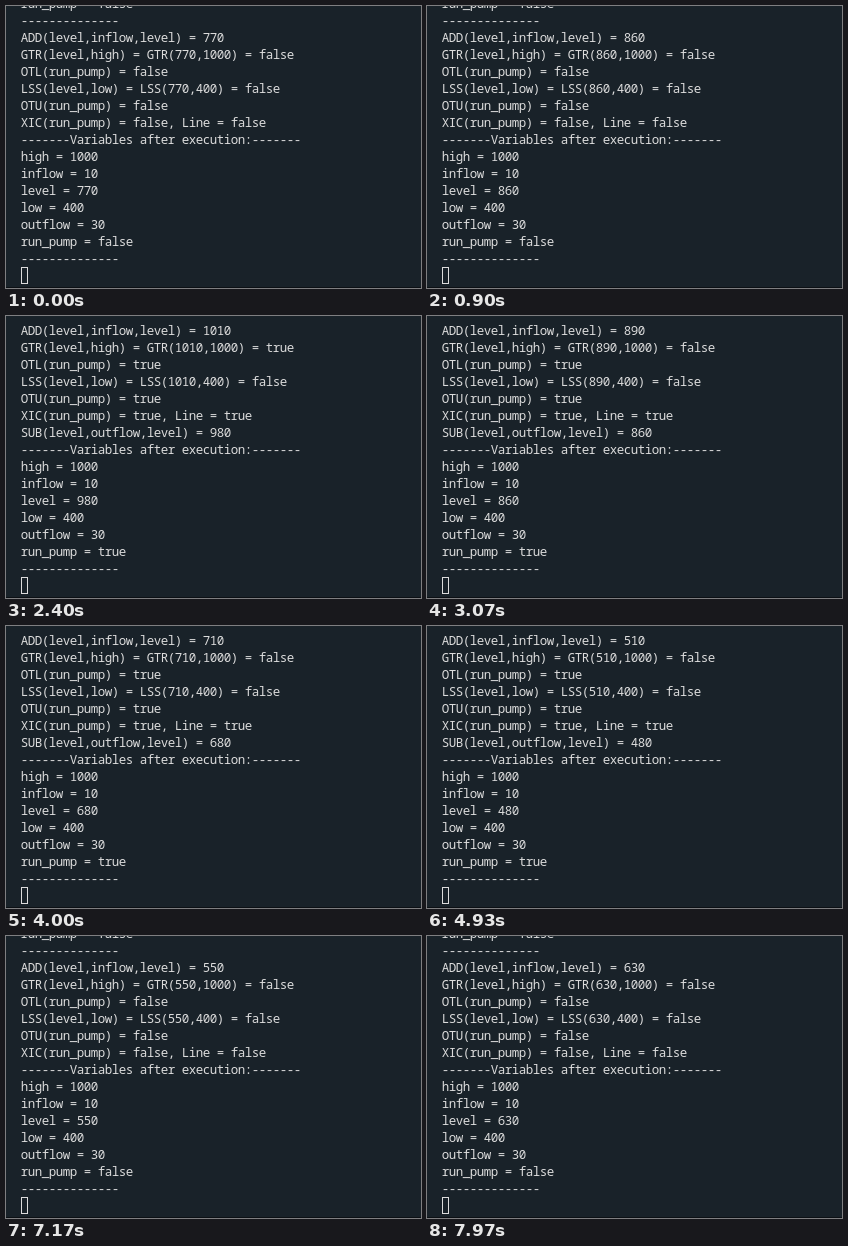
These frames come from a looping animation (415 px wide and 282 px high, 8000 ms). An HTML page with a canvas:

```html
<!DOCTYPE html>
<html lang="en">
<head>
<meta charset="utf-8">
<title>Pump ladder simulation</title>
<style>
  html, body { margin: 0; width: 100%; height: 100%; overflow: hidden; background: #192229; }
  canvas { display: block; }
</style>
</head>
<body>
<canvas id="stage" width="415" height="282"></canvas>
<script>
const LOOP = 8000;
const FIRST_SCAN = 70, SCAN_PERIOD = 101.05;
const LEFT = 15, CELL = 7, ROW = 17, LAST_BASELINE = 257;
const HIGH = 1000, LOW = 400, INFLOW = 10, OUTFLOW = 30;
const BACKGROUND = '#192229', EDGE = '#0c1014', INK = '#dcdcdc';
const ctx = document.getElementById('stage').getContext('2d');

// One pass through the ladder program; returns its printed lines.
function runScan(state) {
  const lines = [];
  const print = text => lines.push(text);

  state.level += INFLOW;
  const { level } = state;
  print(`ADD(level,inflow,level) = ${level}`);

  const tooHigh = level > HIGH;
  print(`GTR(level,high) = GTR(${level},${HIGH}) = ${tooHigh}`);
  if (tooHigh) state.pump = true;
  print(`OTL(run_pump) = ${state.pump}`);

  const tooLow = level < LOW;
  print(`LSS(level,low) = LSS(${level},${LOW}) = ${tooLow}`);
  if (tooLow) state.pump = false;
  print(`OTU(run_pump) = ${state.pump}`);

  print(`XIC(run_pump) = ${state.pump}, Line = ${state.pump}`);
  if (state.pump) {
    state.level -= OUTFLOW;
    print(`SUB(level,outflow,level) = ${state.level}`);
  }

  print('-------Variables after execution:-------');
  print(`high = ${HIGH}`);
  print(`inflow = ${INFLOW}`);
  print(`level = ${state.level}`);
  print(`low = ${LOW}`);
  print(`outflow = ${OUTFLOW}`);
  print(`run_pump = ${state.pump}`);
  print('-'.repeat(14));
  return lines;
}

const scanAt = time => Math.max(0, Math.floor((time - FIRST_SCAN) / SCAN_PERIOD) + 1);

// Each screen holds the tail of the previous scan above the current one.
const state = { level: 750, pump: false };
const screens = [];
let previous = runScan(state);
while (screens.length <= scanAt(LOOP)) {
  const current = runScan(state);
  screens.push([...previous.slice(-2), ...current]);
  previous = current;
}

// Terminal text: every character is centred in its own cell.
function drawLine(text, baseline) {
  [...text].forEach((char, column) => {
    ctx.fillText(char, LEFT + (column + 0.5) * CELL, baseline);
  });
}

function draw(time) {
  ctx.fillStyle = BACKGROUND;
  ctx.fillRect(0, 0, 415, 282);
  ctx.fillStyle = EDGE;
  ctx.fillRect(0, 281, 415, 1);

  ctx.font = '12.5px "Noto Sans Mono", "DejaVu Sans Mono", monospace';
  ctx.textAlign = 'center';
  ctx.fillStyle = INK;
  const lines = screens[scanAt(time)];
  lines.forEach((line, i) => {
    drawLine(line, LAST_BASELINE - ROW * (lines.length - 1 - i));
  });

  ctx.strokeStyle = INK;
  ctx.strokeRect(LEFT + 0.5, 261.5, CELL - 1, ROW - 1);
}

const begin = performance.now();
function tick() {
  draw((performance.now() - begin) % LOOP);
  requestAnimationFrame(tick);
}
tick();
</script>
</body>
</html>
```
